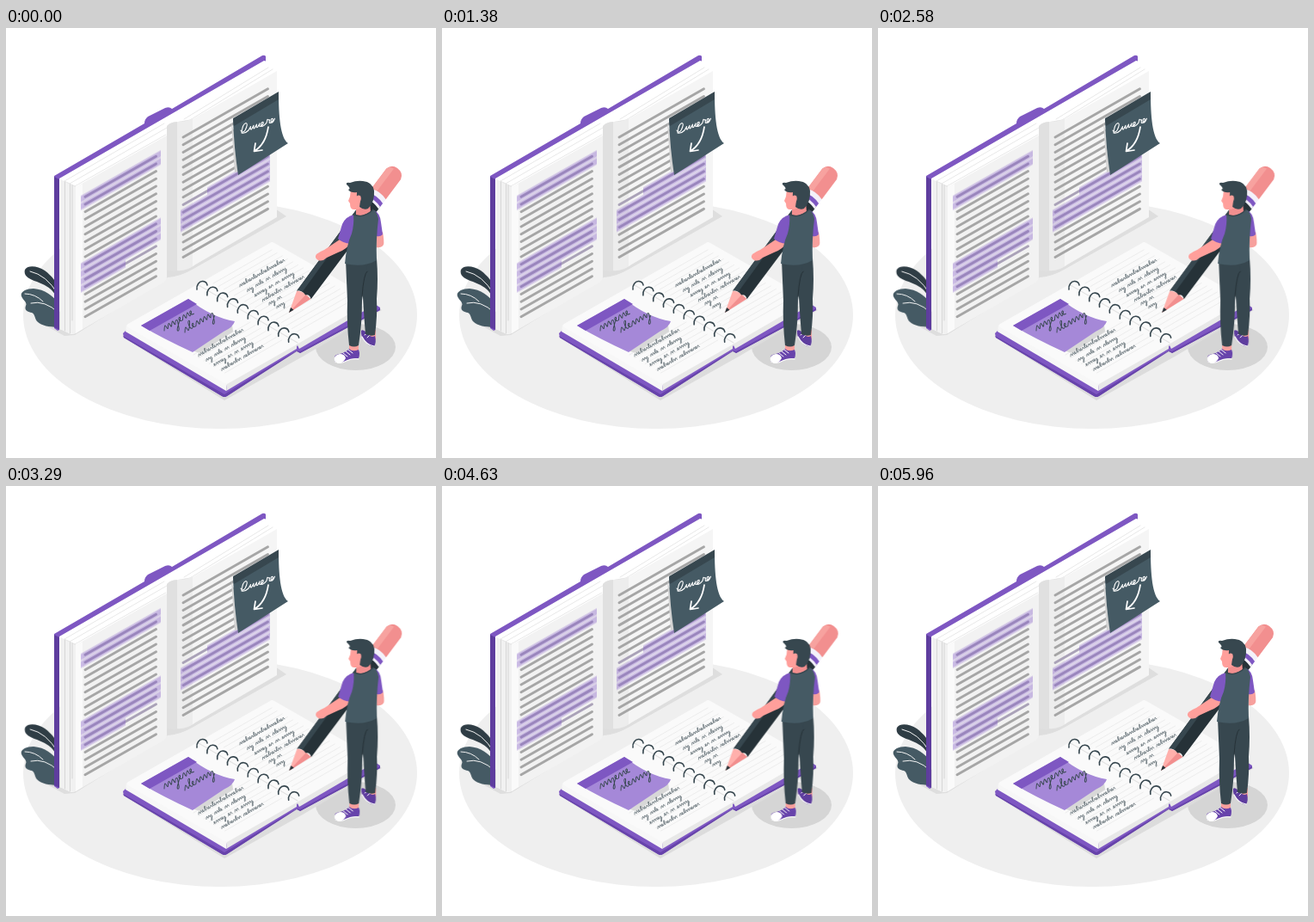
An HTML page that plays this animation: 500 by 500 pixels, repeating every 6000 ms.

```html
<!DOCTYPE html>
<html lang="en">
<head>
<meta charset="utf-8">
<title>Taking notes</title>
<style>
  html, body { margin: 0; width: 100%; height: 100%; overflow: hidden; background: #fff; }
  svg { display: block; width: 100vw; height: 100vh; }
  .writer { animation: shake 6s linear -30ms infinite; }
  .plant { transform-box: fill-box; transform-origin: center; animation: wind 3s linear -30ms infinite; }
  .pen { fill: none; stroke-linecap: round; stroke-linejoin: round; }
  @keyframes shake {
    0%, 100% { transform: translateX(0); }
    10%, 90% { transform: translateX(-1px); }
    20%, 80% { transform: translateX(2px); }
    30%, 50%, 70% { transform: translateX(-4px); }
    40%, 60% { transform: translateX(4px); }
  }
  @keyframes wind {
    0%, 50%, 100% { transform: rotate(0deg); }
    25% { transform: rotate(1deg); }
    75% { transform: rotate(-1deg); }
  }
</style>
</head>
<body>
<svg viewBox="0 0 500 500">
  <ellipse cx="249" cy="333.800" rx="229" ry="132.200" fill="#efefef"/>

  <!-- shadows on the floor -->
  <path d="M38 342L60 331L310 208L326 219L218 280Q203 289 188 290L80 357L68 358Z" fill="#dedede"/>
  <ellipse cx="406.500" cy="371" rx="46.500" ry="27" fill="#d5d5d5"/>

  <g class="plant">
    <path d="M60 316C55 302 45 299 36 295C26 292 20 288 22 281C26 275 37 277 45 282C53 288 60 296 62 306Z" fill="#2f3d45"/>
    <path d="M60 348C50 347 42 347 36 341C33 337 34 333 30 331C25 330 21 328 23 323C25 319 20 317 18 312C16 307 23 303 32 303C45 304 55 311 61 321Z" fill="#455a64"/>
    <path class="pen" d="M28 283Q47 287 60 309M29 320Q45 316 61 331M22 309Q34 309 43 318" stroke="#f5f5f5" stroke-width="1"/>
  </g>

  <!-- standing book -->
  <path d="M56 172L161 111Q161 106 165 103L185 93Q190 91 193 94L298 32Q301 31 302 33V40L300 38L62 175V351L60 352L56 349Z" fill="#7e57c2"/>
  <path d="M56 173L62 176V351L56 348Z" fill="#5e3d9e"/>
  <path d="M63 175L301 38L315 49L315 60L187 136L81 190V355L76 356L63 350Z" fill="#fff"/>
  <path d="M63 176L81 184V355L75 356L63 350Z" fill="#f1f1f1"/>
  <path class="pen" d="M68.500 179V352M74.500 182V355M77 183V340" stroke="#d0d0d0" stroke-width=".8"/>
  <path class="pen" d="M68 178L184 111M74 181L187 116M80 184L186 124M207 106L305 46M214 107L310 48M68 178L80 184" stroke="#dedede" stroke-width=".7"/>
  <path d="M81 185L187 125V290Q187 294 181 297L81 355Z" fill="#f2f2f2"/>
  <path d="M81 185L89 181V350L81 355Z" fill="#fafafa"/>
  <path d="M187 114Q191 109 200 109L217 106V277Q205 285 187 282Z" fill="#e0e0e0"/>
  <path d="M199 109Q211 109 217 105L219 276Q209 283 199 282Z" fill="#ededed"/>
  <path d="M217 106L315 50V220L217 277Z" fill="#f5f5f5"/>
  <g id="lines" class="pen"></g>

  <!-- dark note -->
  <path d="M262 110L266 168L277 165Z" fill="#d3d3d3"/>
  <path d="M264 106L317 75C317 102 319 128 328 134L270 171Q265 139 264 106Z" fill="#455a64"/>
  <path d="M264 105L317 74V83L265 114Z" fill="#37474f"/>
  <g class="pen" stroke="#fff">
    <path d="M273 119q2 4 5 0q4 -8 1 -8.500q-4 1 -5 11.500q4 1 8 -3l2.500 -4.500q-1 4.500 1 3.300l2.500 -4.500q-1 4.500 1 3.300l2.500 -4.500q-1 4.500 1 3.300l2.500 -4.500q-1 4.500 1 3.300q4 -2 3 -5q-3 0 -2 5q2 1 6 -4l1 -4q1 1 2.500 .5q-1 5 1 3.500q4 -2 2.500 -5q-3 .5 -1.500 5q2 0 4 -5" stroke-width="1.100"/>
    <path d="M305 115Q302 135 289 143M290 134L288.500 143.500L298 142" stroke-width="1.700"/>
  </g>

  <!-- notebook -->
  <path d="M138 361L254 433L345 382L437 328L425 318L250 415Z" fill="#dcdcdc"/>
  <path d="M136 355L141 350L255 416L338 370L424 318L435 325V328L342 378L338 375L257 428Q254 430 251 428L137 360Z" fill="#7e57c2"/>
  <path d="M136 358L254 426L338 375L342 376L435 326V328L342 378L338 376L257 428Q254 430 251 428L137 360Z" fill="#6743ab"/>
  <path d="M140 346L257 414L256 422L139 353Z" fill="#f7f7f7"/>
  <path d="M257 414L338 367V373L256 422Z" fill="#e8e8e8"/>
  <path d="M338 367L426 316L430 321L341 373Z" fill="#e8e8e8"/>
  <path d="M307 250Q309 248 312 250L424 314Q427 316 424 318L338 368L259 413Q257 415 254 413L142 348Q139 346 142 344Z" fill="#fafafa"/>
  <path class="pen" d="M224 299L339 366" stroke="#e3e3e3" stroke-width="1.200"/>
  <g id="rules" class="pen" stroke="#e7e7e7" stroke-width=".7"></g>
  <path d="M215 375L263 345L264 353L226 378Z" fill="#d8d8d8"/>
  <path d="M157 346L212 315Q240 337 266 341Q264 348 253 353L217 377Q182 361 157 346Z" fill="#a588d8"/>
  <path d="M157 346L212 315L222 321L167 352Z" fill="#7e57c2"/>
  <g id="notes" class="pen" stroke="#37474f"></g>
  <g id="rings" class="pen" stroke="#37474f" stroke-width="1.600"></g>

  <g class="writer">
    <!-- pencil, drawn along its own axis from the tip -->
    <g transform="translate(329 331) rotate(-53.100)">
      <path d="M0 0L26 -8Q31 1 28 10.500Z" fill="#ffb0ac"/>
      <path d="M0 0L28 3L28 10.500Z" fill="#f28f8f"/>
      <path d="M0 0L6 -1.900V2.400Z" fill="#263238"/>
      <path d="M26 -8L162 -9.500V11H28Q32 6 28 3Q30 -4 26 -8Z" fill="#263238"/>
      <path d="M26 -8L162 -9.500V-4L29 -2Q29 -6 26 -8Z" fill="#37474f"/>
      <path d="M159 -9.500H174Q178 0 174 11H159Q163 0 159 -9.500Z" fill="#f4f1fa"/>
      <path d="M162 -9.500H167Q171 0 167 11H162Q166 0 162 -9.500Z" fill="#7e57c2"/>
      <path d="M173 -10H202Q210 -8 210 0Q210 9 202 11H173Q177 0 173 -10Z" fill="#f28f8f"/>
      <path d="M173 -10H202Q207 -8 207 -3H175Z" fill="#f7a29f"/>
    </g>

    <!-- back foot and leg -->
    <path d="M419 350L430 351V362L420 361Z" fill="#f7a09d"/>
    <path d="M413 352Q415 350 419 354Q424 361 429 358Q431 366 428 370Q423 371 418 365Q412 359 413 352Z" fill="#5e3d9e"/>
    <path class="pen" d="M414 359Q419 369 428 370" stroke="#fff" stroke-width="1.200"/>
    <path class="pen" d="M417 357L421 354M420 360L423 357" stroke="#fff" stroke-width="1"/>
    <path d="M408 270L431 268Q433 292 431 315Q432 334 429 357Q424 359 418 356Q416 332 415 313Z" fill="#37474f"/>
    <!-- front foot and leg -->
    <path d="M399 366L410 367V379L399 378Z" fill="#f7a09d"/>
    <path d="M382 384Q381 380 388 379Q395 377 399 373Q403 377 410 374Q412 379 410 384Q400 384 394 388Q386 391 382 387Z" fill="#6743ab"/>
    <path d="M382 387Q380 381 388 379Q394 379 395 384Q392 390 386 390Z" fill="#fff"/>
    <path class="pen" d="M383 388Q389 391 396 387Q402 384 410 385" stroke="#fff" stroke-width="1.200"/>
    <path class="pen" d="M392 378L397 382M395 376L400 380M398 374L403 378" stroke="#fff" stroke-width="1"/>
    <path d="M395 270L421 270Q417 294 414 317Q414 344 410 369Q405 372 399 369Q396 343 397 317Z" fill="#37474f"/>
    <path class="pen" d="M420 283Q416 285 414 312" stroke="#263238" stroke-width="1"/>

    <!-- arms -->
    <path d="M431 239L438 237Q440 248 439 252Q436 256 431 255Z" fill="#f7a09d"/>
    <path d="M428 212Q435 215 436 226L438 240Q435 243 431 242Z" fill="#7e57c2"/>
    <path d="M388 246L401 249Q397 257 386 261L373 267Q368 272 363 270Q358 267 361 263Q365 260 370 258Z" fill="#ff9f9b"/>
    <path d="M405 217Q395 219 391 228L386 245Q391 250 401 251L406 235Z" fill="#7e57c2"/>

    <!-- torso and head -->
    <path d="M407 205L423 202L424 214Q417 220 407 217Z" fill="#f28f8f"/>
    <path d="M404 217Q415 221 427 211Q432 214 433 222Q430 246 431 270Q416 279 394 274Q396 252 402 239Q405 228 404 217Z" fill="#455a64"/>
    <path class="pen" d="M404 217Q416 222 427 211" stroke="#37474f" stroke-width="1.200"/>
    <path d="M401 187L414 187L419 204Q414 212 404 211Q400 211 400 204L398 201L400 196Z" fill="#ff9f9b"/>
    <path d="M396 182Q395 179 400 180Q408 177 415 178Q426 179 428 189Q429 202 421 210Q416 212 411 208L412 201Q407 200 408 191Q401 192 398 188Q402 187 396 182Z" fill="#37474f"/>
    <path d="M407 198Q408 193 412 195Q414 199 411 203Q407 204 407 198Z" fill="#ff9f9b"/>
  </g>
</svg>
<script>
  const $ = id => document.getElementById(id);
  const add = (parent, d, attrs = {}) => {
    const el = document.createElementNS('http://www.w3.org/2000/svg', 'path');
    el.setAttribute('d', d);
    for (const key in attrs) el.setAttribute(key, attrs[key]);
    $(parent).append(el);
  };

  // One page of printed lines; marks maps a row to the span of its highlighter.
  function printPage(x1, x2, top, marks) {
    const slope = .57, gap = 8.72;
    for (let row = 0; row < 17; row++) {
      const at = (x, dy = 0) => `${x} ${top + row * gap - (x - x1) * slope + dy}`;
      const mark = marks[row];
      const band = (half, opacity) => add('lines',
        `M${at(mark[0], -half)}L${at(mark[1], -half)}L${at(mark[1], half)}L${at(mark[0], half)}Z`,
        { fill: '#7e57c2', opacity });
      add('lines', `M${at(x1)}L${at(x2)}`, {
        stroke: mark ? '#aaa2b8' : '#a6a6a6', 'stroke-width': 2.9
      });
      if (mark) {
        band(gap / 2, .22);
        band(3, .2);
      }
    }
  }
  const left = [87, 180], right = [203, 307];
  printPage(92, 174.5, 196.2, { 0: left, 1: left, 9: left, 10: left, 11: left, 12: [87, 139] });
  printPage(206, 304.5, 127, { 9: [234, 307], 10: right, 11: right, 12: right });

  // Rules run parallel to the front edge of the notebook.
  for (let i = 0; i < 17; i++) {
    const dx = i * 6.1, dy = i * 3.5;
    add('rules', `M${241 + dx} ${297 + dy}l68 -39`);
    if (i > 9) add('rules', `M${157 + dx} ${345 + dy}l66 -38`);
  }

  for (let i = 0; i < 10; i++) {
    add('rings', `M${222 + i * 11.85} ${304 + i * 6.8}c-1 -5 3 -10 7 -9.500q4.500 .5 5 4.500`);
  }

  // Cursive strokes: each starts and ends on the baseline.
  const stroke = {
    n: 'c.5 -1 1 -3 1.600 -3s.2 3 1 3',
    e: 'c1.400 -.6 2 -3 1.200 -3s-1.400 3 1.400 3',
    l: 'c1.600 -2 3.200 -6 2.200 -6s-1.600 6 .4 6',
    y: 'c.8 -3 2.200 -3 2 -1l-.8 5c-.6 2 -1.800 1 -1 -.5s1.600 -2 2.400 -3.500',
    ' ': 'm3.500 0'
  };
  const write = (x, y, text, size = 1, width = .6) =>
    add('notes', 'M0 0' + [...text].map(c => stroke[c]).join(''), {
      transform: `translate(${x} ${y}) matrix(.87 -.5 .3 .8 0 0) scale(${size})`,
      'stroke-width': width
    });

  const rows = [
    'nnelnenlennlnelnnnelnen',
    'nny nnle nn nlennny',
    'ennney en nn ennnny',
    'nnelnenlnn nelnnnenen'
  ];
  rows.forEach((text, i) => {
    write(224 + i * 9, 382 + i * 5.5, text);
    write(272 + i * 8.8, 301 + i * 5.7, text);
  });
  write(306, 322, 'nny nn');
  write(315, 326, 'nnny');
  write(184, 352, 'nnnyenne', 1.9, .55);
  write(208, 354, 'nlennnny', 1.9, .55);
</script>
</body>
</html>
```
